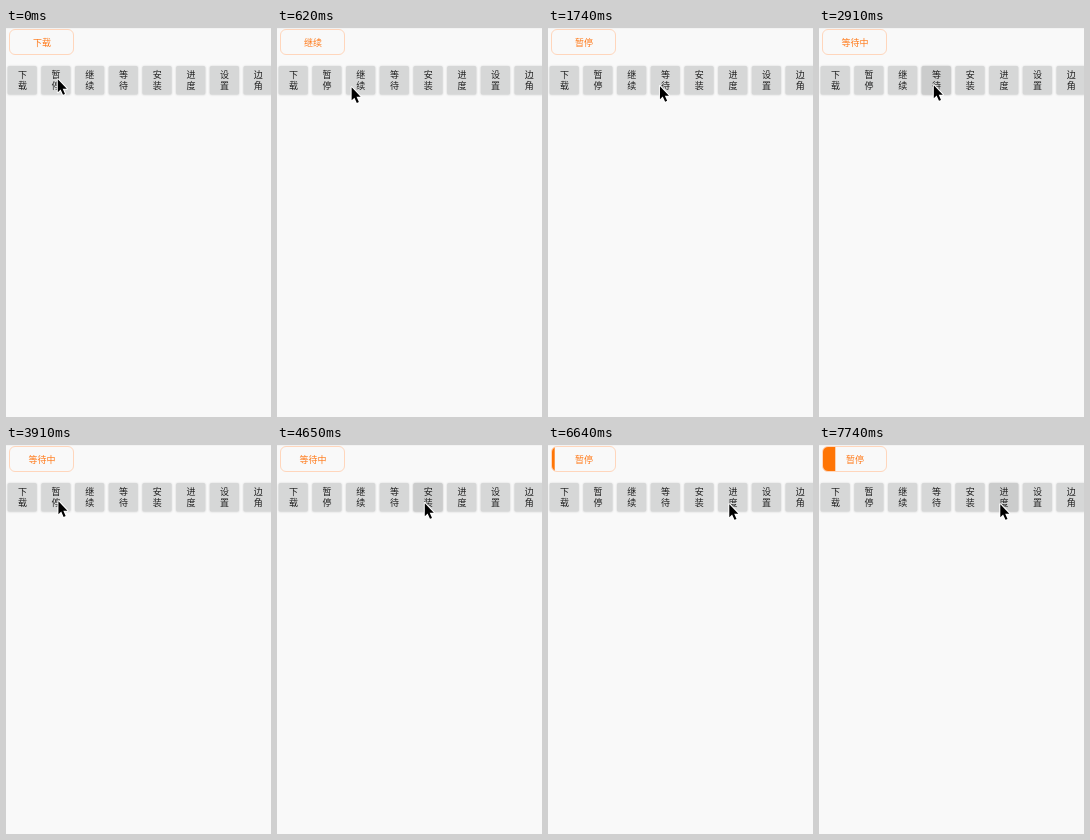
Animation, 265 px wide and 389 px high, one loop 8 s. Source, as an HTML page:

```html
<!DOCTYPE html>
<html lang="zh-CN">
<head>
<meta charset="utf-8">
<style>
html, body { margin: 0; width: 100%; height: 100%; overflow: hidden; background: #f9f9f9; }
svg { display: block; width: 265px; height: 389px; }
text { font: 9px "Noto Sans CJK SC", "Noto Sans CJK", "Noto Sans", sans-serif; text-anchor: middle; }
#label { font-weight: 500; }
</style>
</head>
<body>
<svg viewBox="0 0 265 389" lang="zh-CN">
  <defs>
    <clipPath id="pill"><rect x="3.5" y="1.5" width="64.5" height="25" rx="5.5"/></clipPath>
    <filter id="soft" x="-20%" y="-20%" width="140%" height="140%"><feGaussianBlur stdDeviation=".8"/></filter>
  </defs>
  <rect width="265" height="389" fill="#f9f9f9"/>
  <rect width="265" height="1" fill="#f3f3f3"/>
  <rect id="bar" x="3.5" y="1.5" width="0" height="25" fill="#ff7505" clip-path="url(#pill)"/>
  <rect x="3.5" y="1.5" width="64" height="25" rx="5.5" fill="none" stroke="#ffd6bc"/>
  <text id="label" x="36" y="18" fill="#ff7a1a"></text>
  <g id="row"></g>
  <path id="cursor" d="M.8 1.2V14.2L3.6 11.5L6 16.8L8 15.9L5.7 10.7H9.8Z"
    fill="#000" stroke="#fff" stroke-width="2" stroke-linejoin="round" paint-order="stroke"/>
</svg>
<script>
const LOOP = 8000, LAG = 40;
const $ = id => document.getElementById(id);
const names = ['下载', '暂停', '继续', '等待', '安装', '进度', '设置', '边角'];
const PROGRESS = names.indexOf('进度');

const click = (time, button, hold, label) => ({ time, button, hold, label });
const clicks = [
  click(230, 1, 270, '继续'),
  click(1190, 2, 270, '暂停'),
  click(2680, 3, 800, '等待中'),
  click(4650, 4, 690, '安装'),
  click(6440, PROGRESS, 200, '暂停'),
  click(6920, PROGRESS, 520, '暂停'),
  click(7440, PROGRESS, 260, '暂停'),
  click(7700, PROGRESS, 300, '暂停')
];

// Pointer rests: start and end of the move there, then the place
const rest = (start, end, x, y) => ({ start, end, x, y });
const rests = [
  rest(470, 750, 80, 58), rest(1400, 1880, 114, 56), rest(3450, 3880, 51, 55),
  rest(3910, 4210, 147, 57), rest(5310, 5730, 180.5, 58)
];

const buttons = names.map((name, i) => {
  const g = document.createElementNS('http://www.w3.org/2000/svg', 'g');
  const x = 1.6 + i * 33.7;
  g.innerHTML = `<rect x="${x}" y="38.2" width="29.2" height="28.6" rx="1.5" filter="url(#soft)"/>
    <rect x="${x}" y="37.9" width="29.2" height="28.6" rx="1.5"/>
    <text x="${x + 14.8}" y="50" fill="#202020">${name[0]}</text>
    <text x="${x + 14.8}" y="60.6" fill="#202020">${name[1]}</text>`;
  $('row').append(g);
  return g.children;
});

function pointer(t) {
  let x = 51, y = 50;
  for (const r of rests) {
    if (t < r.start) break;
    const u = Math.min(1, (t - r.start) / (r.end - r.start));
    const k = 1 - (1 - u) ** 2;
    x += (r.x - x) * k;
    y += (r.y - y) * k + 3 * Math.sin(Math.PI * k);
  }
  return [x, y];
}

function draw(t) {
  const done = clicks.filter(c => t >= c.time + LAG);
  $('label').textContent = done.length ? done.at(-1).label : names[0];
  $('bar').setAttribute('width', 3.2 * done.filter(c => c.button === PROGRESS).length);

  const held = clicks.find(c => t >= c.time && t < c.time + c.hold);
  buttons.forEach(([shadow, face], i) => {
    const down = held && held.button === i;
    face.setAttribute('fill', down ? '#cbcccc' : '#d6d7d7');
    shadow.setAttribute('opacity', down ? .26 : .16);
  });
  $('cursor').setAttribute('transform', `translate(${pointer(t)})`);
}

const start = performance.now();
function frame() {
  draw((performance.now() - start) % LOOP);
  requestAnimationFrame(frame);
}
frame();
</script>
</body>
</html>
```
